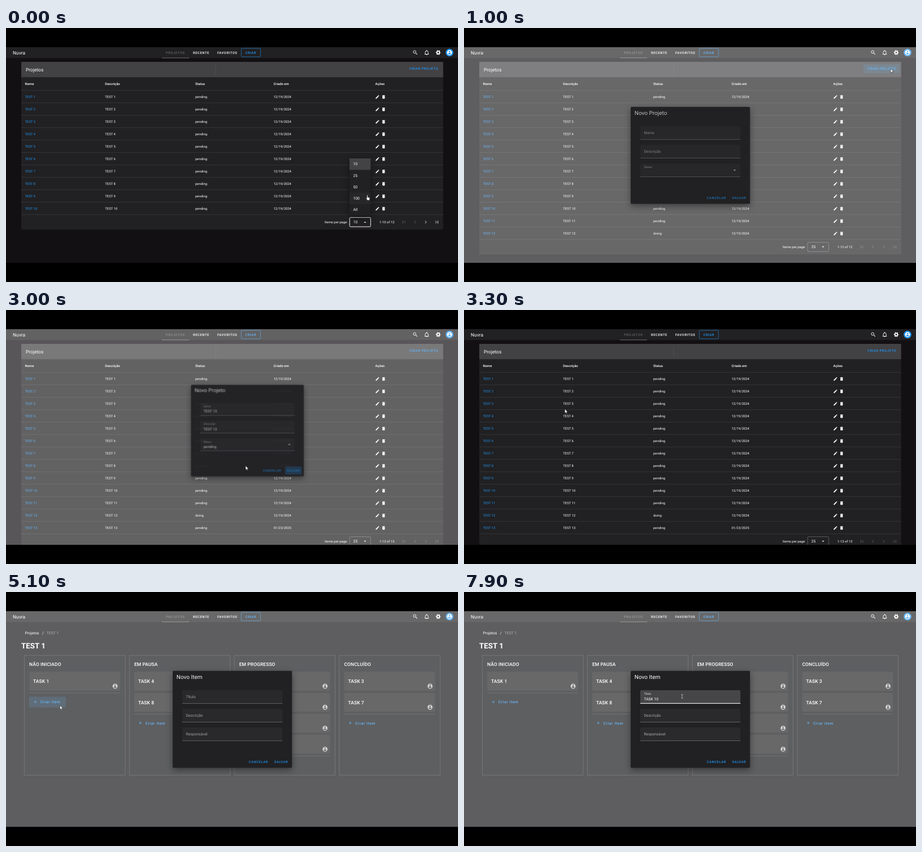
Recreate the animation shown at these times as an HTML page. Size 800 by 450 pixels, loop 8 s.

```html
<!DOCTYPE html>
<html lang="pt">
<head>
<meta charset="utf-8">
<title>Projetos</title>
<style>
  html, body { margin: 0; width: 100%; height: 100%; overflow: hidden; background: #000; }
  svg { display: block; width: 800px; height: 450px; font-family: Roboto, sans-serif; text-rendering: geometricPrecision; }
  .shadow { filter: drop-shadow(0 4px 6px rgba(0, 0, 0, .4)); }
</style>
</head>
<body>
<svg id="stage" viewBox="0 0 800 450"></svg>
<script>
const LOOP = 8000, STEP = 100;
const PAGE = '#121013', SURFACE = '#212022', BLUE = '#2196f3', WHITE = '#fff';
const SMALL = 5.92, BODY = 6.77, LARGE = 8.46, HEAD = 10;
const stage = document.getElementById('stage');

const PENCIL = 'M20.71 7.04C21.1 6.65 21.1 6 20.71 5.63L18.37 3.29C18 2.9 17.35 2.9 16.96 3.29L15.12 5.12L18.87 8.87M3 17.25V21H6.75L17.81 9.93L14.06 6.18Z';
const TRASH = 'M19 4H15.5L14.5 3H9.5L8.5 4H5V6H19M6 19A2 2 0 0 0 8 21H16A2 2 0 0 0 18 19V7H6Z';
const BELL = 'M10 21H14A2 2 0 0 1 10 21M21 19V20H3V19L5 17V11C5 7.9 7 5.2 10 4.3V4A2 2 0 0 1 14 4V4.3C17 5.2 19 7.9 19 11V17ZM17 11A5 5 0 0 0 7 11V18H17Z';
const PERSON = 'M2 12A10 10 0 0 1 22 12A10 10 0 0 1 2 12M9 8A3 3 0 0 0 15 8A3 3 0 0 0 9 8M12 19.2C9.5 19.2 7.3 17.9 6 16C6 14 10 12.9 12 12.9S18 14 18 16C16.7 17.9 14.5 19.2 12 19.2';

const clamp = v => Math.max(0, Math.min(1, v));
const ramp = (t, from, to) => clamp((t - from) / (to - from));
const during = (t, from, to) => t >= from && t < to;
const typed = (text, t, start, pace) => text.slice(0, Math.max(0, Math.floor((t - start) / pace) + 1));

const rect = (x, y, w, h, fill, extra = '') =>
  `<rect x="${x}" y="${y}" width="${w}" height="${h}" fill="${fill}" ${extra}/>`;

// y is the middle of the capital letters
const text = (s, x, y, size = SMALL, fill = WHITE, extra = '') =>
  `<text x="${x}" y="${y + size * .356}" font-size="${size}" fill="${fill}" ${extra}>${s}</text>`;

const button = (s, x, y, fill = BLUE, size = SMALL) =>
  text(s, x, y, size, fill, `font-weight="500" letter-spacing="${size * .0893}"`);

const at = (x, y, size, body) =>
  `<g transform="translate(${x - size / 2} ${y - size / 2}) scale(${size / 24})">${body}</g>`;
const icon = (d, x, y, size, fill = WHITE) =>
  at(x, y, size, `<path d="${d}" fill="${fill}" fill-rule="evenodd"/>`);
const lines = (d, x, y, size, color = WHITE) =>
  at(x, y, size, `<path d="${d}" fill="none" stroke="${color}" stroke-width="2"/>`);
const arrow = (x, y, up) =>
  `<path d="M${x - 2.2} ${y + (up ? 1.1 : -1.1)}h4.4l-2.2 ${up ? -2.2 : 2.2}z" fill="#ddd"/>`;

function header() {
  const cog = '<circle cx="12" cy="12" r="5.4" fill="none" stroke="#fff" stroke-width="4"/>' +
    '<circle cx="12" cy="12" r="8.4" fill="none" stroke="#fff" stroke-width="3" stroke-dasharray="4.8 4" stroke-dashoffset="2.4"/>';
  return rect(0, 34, 800, 19.3, SURFACE) +
    text('Nuvra', 12, 43.5, LARGE) +
    button('PROJETOS', 283, 43.5, '#656466') + rect(276, 52.5, 48, .9, '#777') +
    button('RECENTE', 331, 43.5, WHITE) +
    button('FAVORITOS', 374, 43.5, WHITE) +
    rect(416.4, 36, 34, 15, 'none', `rx="1.6" stroke="${BLUE}" stroke-width=".6"`) +
    button('CRIAR', 423.5, 43.5) +
    at(724.3, 43.5, 10.2, '<path d="M14.5 14.5L20 20" stroke="#fff" stroke-width="2.6"/><circle cx="9.5" cy="9.5" r="5.5" fill="none" stroke="#fff" stroke-width="2.2"/>') +
    icon(BELL, 744.6, 43.5, 10.2) +
    at(765, 43.5, 10.2, cog) +
    `<circle cx="785" cy="43.5" r="6.8" fill="${BLUE}"/>` + icon(PERSON, 785, 43.5, 10.6);
}

function tablePage(t) {
  const short = t < 300;
  const count = short ? 10 : t < 3000 ? 12 : 13;
  const total = t < 3000 ? 12 : 13;
  const end = 110.7 + count * 22, mid = end + 13.2;
  let out = rect(27, 60, 746.7, end - 33.6, SURFACE) +
    rect(27, 60, 746.7, 27.2, '#424143') +
    rect(370.8, 64, .6, 19.5, '#59585a') +
    text('Projetos', 35, 74, LARGE);
  if (during(t, 800, 1100)) out += rect(706.5, 64.5, 65, 15.3, BLUE, 'rx="1.7" opacity=".16"');
  out += button('CRIAR PROJETO', 714, 72.2);

  const cols = [33.5, 175.3, 335, 473.5, 653.5];
  ['Nome', 'Descrição', 'Status', 'Criado em', 'Ações'].forEach((s, i) =>
    out += text(s, cols[i], 99, SMALL, WHITE, 'font-weight="500"'));
  for (let i = 0; i < count; i++) {
    const y = 121.8 + i * 22, name = 'TEST ' + (i + 1);
    out += rect(27, y - 11.3, 746.7, .55, '#454447') +
      text(name, cols[0], y, SMALL, BLUE) + text(name, cols[1], y) +
      text(i === 11 ? 'doing' : 'pending', cols[2], y) +
      text(i === 12 ? '01/23/2025' : '12/19/2024', cols[3], y) +
      icon(PENCIL, 657.4, y + .3, 8.4) + icon(TRASH, 668.3, y + .3, 8.4);
  }
  out += rect(27, end - .2, 746.7, .55, '#454447') +
    text('Items per page:', 564, mid) +
    rect(608.2, mid - 8.2, 37.2, 16.4, 'none', `rx="1.6" stroke="${short ? WHITE : '#8a898b'}" stroke-width="${short ? .95 : .55}"`) +
    text(short ? '10' : '25', 614.8, mid, BODY) + arrow(635.5, mid, short) +
    text(`1-${count} of ${total}`, 661, mid);
  const dim = '#676669', next = short ? WHITE : dim;
  out += lines('M17.7 6.7L12.4 12L17.7 17.3M7 6V18', 704.5, mid, 10.2, dim) +
    lines('M14.7 6.7L9.4 12L14.7 17.3', 724, mid, 10.2, dim) +
    lines('M9.3 6.7L14.6 12L9.3 17.3', 743, mid, 10.2, next) +
    lines('M6.3 6.7L11.6 12L6.3 17.3M17 6V18', 762.3, mid, 10.2, next);
  if (short) {
    out += rect(608, 231, 37.4, 101.5, SURFACE, 'rx="1.6" class="shadow"') +
      rect(608, 231, 37.4, 20.3, '#434244');
    if (t < 100) out += rect(608, 291.8, 37.4, 20.3, '#272628');
    ['10', '25', '50', '100', 'All'].forEach((s, i) => out += text(s, 614.5, 241 + i * 20.25, BODY));
  }
  return out;
}

function boardPage(t) {
  const columns = [['NÃO INICIADO', [1]], ['EM PAUSA', [4, 8]], ['EM PROGRESSO', [2, 5, 6, 9]], ['CONCLUÍDO', [3, 7]]];
  const bold = 'font-weight="500" letter-spacing=".1"';
  let out = text('Projetos', 33.5, 72.3, BODY) + text('/', 64, 72.3, BODY) +
    text('TEST 1', 71.8, 72.3, BODY, '#8a898b') +
    text('TEST 1', 27, 95, 13.4, WHITE, 'font-weight="700"');
  columns.forEach(([title, tasks], i) => {
    const x = 32.5 + i * 185.8, left = x + 8.6, end = 141.6 + tasks.length * 37.2;
    out += rect(x, 112.2, 178.5, 212.4, '#111316', 'stroke="#454548" stroke-width=".7"') +
      text(title, left, 128, LARGE, WHITE, bold);
    tasks.forEach((n, j) => {
      const y = 141.3 + j * 37.2;
      out += rect(left, y, 160.8, 33.6, SURFACE, 'rx="1.7"') +
        text('TASK ' + n, left + 7, y + 17.1, LARGE, WHITE, bold) +
        icon(PERSON, left + 152, y + 25.6, 10.4, '#c8c7c9');
    });
    out += rect(left, end - .2, 160.8, .6, '#454548');
    if (i === 0 && during(t, 4700, 5300)) out += rect(41, end + 6.6, 65, 19.2, BLUE, 'rx="1.7" opacity=".16"');
    out += lines('M12 5V19M5 12H19', left + 10.8, end + 15.9, 8.6, BLUE) +
      button('Criar item', left + 19.6, end + 16.1, BLUE, BODY);
  });
  return out;
}

function field(y, { label, value = '', focus = 0, hover, float, select }) {
  const raised = float || focus > 0 || value;
  const fill = focus === 1 ? '#464547' : hover ? '#343335' : '#2a292b';
  let out = `<path d="M312 ${y + 23.7}v-22q0-1.7 1.7-1.7h173.8q1.7 0 1.7 1.7v22z" fill="${fill}"/>` +
    rect(312, y + 23.2, 177.2, .6, '#8a898b') +
    text(label, 318.4, y + (raised ? 6.5 : 11.4), raised ? 5.08 : BODY, focus === 1 ? '#e8e8e8' : '#aaa9ab');
  if (value) out += text(value, 318.4, y + 15.5, BODY);
  if (focus) out += rect(400.6 - 88.6 * focus, y + 22.8, 177.2 * focus, 1, WHITE);
  if (select) out += arrow(479, y + 12);
  return out;
}

function dialog(t, { title, fields, open, close = Infinity, home, salvar, extra = '' }) {
  if (t < open || t >= close + 180) return '';
  const leave = ramp(t, close, close + 180);
  const away = t < close ? 1 - ramp(t, open, open + 65) : leave ** 2.5;
  const inner = t < close ? ramp(t, open, open + 100) : 1 - leave * .8;
  const dx = away * (home[0] - 400.5), dy = away * (home[1] - 225.5);
  let body = text(title, 301.8, 150, HEAD);
  fields.forEach((f, i) => body += field(174 + i * 33, f));
  if (salvar) body += rect(471, 292.8, 31.5, 15.3, BLUE, 'rx="1.7" opacity=".3"');
  body += button('CANCELAR', 429.6, 300.7) + button('SALVAR', 474.6, 300.7);
  return rect(0, 34, 800, 382, WHITE, `opacity="${.32 * (1 - away)}"`) +
    `<g opacity="${1 - .6 * away}" transform="translate(${400.5 + dx} ${225.5 + dy}) scale(${1 - .7 * away}) translate(-400.5 -225.5)">` +
    rect(295, 139.7, 211.2, 171.8, SURFACE, 'rx="1.7" class="shadow"') +
    `<g opacity="${inner}">${body}</g></g>` + extra;
}

function projectDialog(t) {
  let menu = '';
  if (during(t, 2200, 2500)) {
    menu = rect(312, 264, 177.2, 88, SURFACE, 'rx="1.7" class="shadow"') +
      rect(312, 267.4, 177.2, 20.3, '#343335');
    ['pending', 'doing', 'paused', 'done'].forEach((s, i) => menu += text(s, 318.4, 277.5 + i * 20.3, BODY));
  }
  return dialog(t, {
    title: 'Novo Projeto', open: 930, close: 2935, home: [740, 72], salvar: t >= 2700, extra: menu,
    fields: [
      { label: 'Nome', value: typed('TEST 13', t, 1300, 40), focus: +during(t, 1200, 1600) },
      { label: 'Descrição', value: typed('TEST 13', t, 1700, 40), focus: +during(t, 1600, 2200) },
      { label: 'Status', float: true, select: true, value: t >= 2500 ? 'pending' : '',
        hover: during(t, 2000, 2200), focus: during(t, 2100, 2800) ? (t < 2200 ? .02 : 1) : 0 }
    ]
  });
}

const itemDialog = t => dialog(t, {
  title: 'Novo Item', open: 5005, home: [73, 195],
  fields: [
    { label: 'Título', value: typed('TASK 10', t, 6100, 150), focus: +(t >= 5600), hover: t >= 5400 },
    { label: 'Descrição' },
    { label: 'Responsável' }
  ]
});

// time, x, y, shape
const PATH = [
  [0, 639, 296, 'hand'], [200, 620, 260, 'hand'], [400, 620, 260, 'arrow'], [800, 755, 72, 'hand'],
  [1000, 755, 72, 'arrow'], [1200, 380, 186, 'beam'], [1500, 380, 186, 'beam'], [1600, 380, 219, 'beam'],
  [1900, 380, 219, 'beam'], [2000, 378.5, 253.5, 'hand'], [2200, 378.5, 253.5, 'hand'], [2400, 350, 277, 'hand'],
  [2500, 350, 277, 'arrow'], [2700, 487, 300, 'hand'], [2900, 487, 300, 'hand'], [3000, 424, 276, 'arrow'],
  [3500, 45, 121, 'hand'], [3900, 45, 121, 'arrow'], [4300, 64, 130, 'beam'], [4400, 64, 130, 'arrow'],
  [4800, 95.5, 201, 'hand'], [5100, 95.5, 201, 'arrow'], [5200, 95.5, 201, 'arrow'], [5500, 386, 185, 'beam'],
  [LOOP, 386, 185, 'beam']
];
const SHAPES = {
  arrow: '<path d="M0 0V7.2L1.7 5.7L2.8 8.2L4 7.7L2.9 5.2H5.2Z" fill="#fff" stroke="#111" stroke-width=".5"/>',
  hand: '<path d="M-.2.9a.8.8 0 0 1 1.6 0V3.8l2.7.7q1 .4.8 1.5L4.1 9.2H.8L-1.7 6q0-1 1.5-.5z" fill="#fff" stroke="#111" stroke-width=".5"/>',
  beam: '<path d="M-1.5-3.4Q0-3.4 0-2.6Q0-3.4 1.5-3.4M0-2.8V2.8M-1.5 3.4Q0 3.4 0 2.6Q0 3.4 1.5 3.4" fill="none" stroke="#ddd" stroke-width=".7"/>'
};

function cursor(t) {
  const i = PATH.findIndex((p, k) => k && t < p[0]);
  const a = PATH[i - 1], b = PATH[i];
  const u = ramp(t, a[0], b[0]), e = u * u * (3 - 2 * u);
  return `<g transform="translate(${a[1] + (b[1] - a[1]) * e} ${a[2] + (b[2] - a[2]) * e})">${SHAPES[a[3]]}</g>`;
}

function draw(t) {
  const page = t < 3900 ? tablePage(t) : boardPage(t);
  stage.innerHTML = rect(0, 0, 800, 450, '#000') +
    '<clipPath id="screen"><rect y="34" width="800" height="382"/></clipPath><g clip-path="url(#screen)">' +
    rect(0, 34, 800, 382, PAGE) + page + header() + projectDialog(t) + itemDialog(t) + cursor(t) + '</g>';
}

let shown = -1;
const start = performance.now();
function tick() {
  const t = Math.floor(((performance.now() - start) % LOOP) / STEP) * STEP;
  if (t !== shown) draw(shown = t);
  requestAnimationFrame(tick);
}
tick();
</script>
</body>
</html>
```
